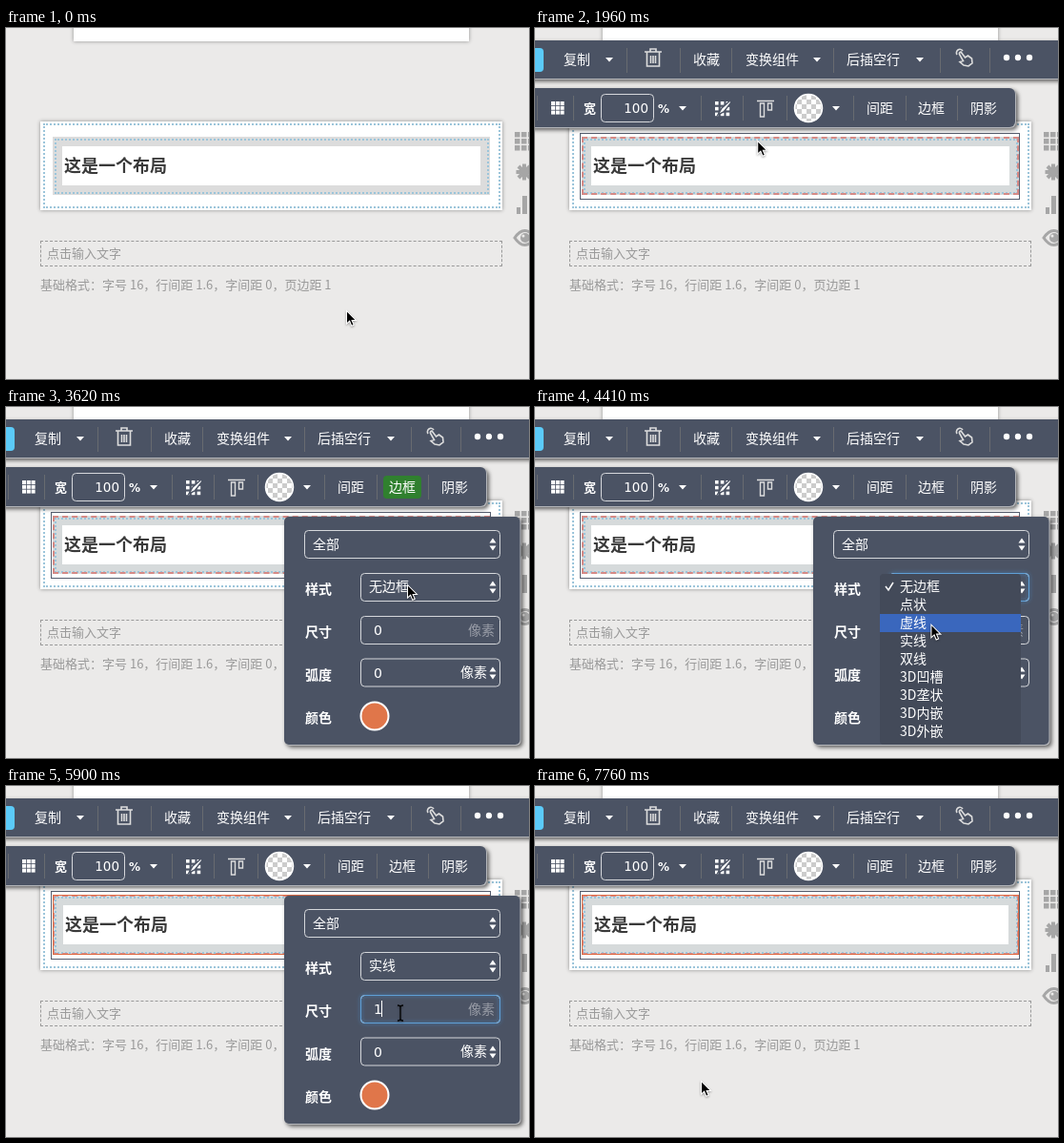
An HTML page that plays this animation: 549x368 px, repeating every 8 s.

```html
<!DOCTYPE html>
<html lang="zh">
<head>
<meta charset="utf-8">
<style>
html, body { margin: 0; width: 100%; height: 100%; overflow: hidden; background: #ebeae9; }
svg { display: block; font: 14px "Noto Sans CJK SC", "Noto Sans CJK", sans-serif; }
text { white-space: pre; }
.num { font-family: "DejaVu Sans", sans-serif; }
.bold { font-weight: 700; }
.hint { font-size: 13px; fill: #999; }
.bar { fill: #4b5364; filter: drop-shadow(1px 1px 0 #b4b6ba) drop-shadow(2px 2px 2px rgba(0,0,0,.6)); }
.field { fill: none; stroke: #d5d7db; }
.ring { fill: none; stroke: #5f9fd6; filter: drop-shadow(0 0 2px #4aa3f0); }
.box { position: absolute; box-sizing: border-box; }
.card { background: #fff; box-shadow: 0 0 4px rgba(0,0,0,.4); }
.dots { border: 2px dotted #9cc5da; }
.selected { border: 2px dashed #d68a86; }
.bordered { border: 1px solid #e06c45; }
.outlined { border: 1px solid #555d6e; }
.input { border: 1px dashed #999; }
.cursor { filter: drop-shadow(0 1px 1px rgba(0,0,0,.35)); }
</style>
</head>
<body>
<svg id="stage" width="549" height="368" viewBox="0 0 549 368"></svg>
<script>
const LOOP = 8000, STEP = 86;

const rect = (x1, y1, x2, y2, attrs = '') =>
  `<rect x="${x1}" y="${y1}" width="${x2 - x1}" height="${y2 - y1}" ${attrs}/>`;
const box = (x1, y1, x2, y2, cls, background = 'none') =>
  `<div class="box ${cls}" style="left:${x1}px;top:${y1}px;width:${x2 - x1}px;height:${y2 - y1}px;`
  + (background === 'none' ? '"></div>' : `background:${background}"></div>`);
const boxes = body => `<foreignObject width="549" height="368"><div style="position:relative">${body}</div></foreignObject>`;
const text = (x, y, s, attrs = '') => `<text x="${x}" y="${y}" ${attrs}>${s}</text>`;
const path = (d, attrs = '') => `<path d="${d}" ${attrs}/>`;
const circle = (x, y, r, attrs = '') => `<circle cx="${x}" cy="${y}" r="${r}" ${attrs}/>`;
const group = (id, body, attrs = '') => `<g id="${id}" ${attrs}>${body}</g>`;
const times = (n, f) => Array.from({ length: n }, (_, i) => f(i)).join('');
const grid = (x, y, size, pitch) => times(9, i => {
  const left = x + i % 3 * pitch, top = y + (i / 3 | 0) * pitch;
  return rect(left, top, left + size, top + size);
});
const dividers = (y, xs) =>
  path(xs.map(x => `M${x}.5 ${y}v26`).join(''), 'stroke="#686b70" fill="none"');
const carets = (y, xs) => path(xs.map(x => `M${x - 4} ${y - 2}h8l-4 4.5z`).join(''));
const spinner = y => path(`M507.5 ${y - 1.5}l3.5-5 3.5 5zM507.5 ${y + 1.5}l3.5 5 3.5-5z`);
const field = (y, x = 372.5, cls = 'field') =>
  rect(x, y, 518.5, y + 29, `rx="4" class="${cls}"`);

// The edited block; a 1px border makes it 2px taller.
function layout(selected, outlined, bordered) {
  const b = bordered ? 1 : 0, g = 2 * b;
  return boxes(
      box(36, 98, 521, 191 + g, 'card')
      + box(39, 100, 519, 189 + g, 'dots')
      + box(49, 114, 508, 175 + g, '', outlined ? '#d6dadb' : '#dcdcdc')
      + box(51, 116, 507, 174 + g, 'dots')
      + box(59 + b, 124 + b, 498 - b, 165 + b, '', '#fff')
      + (selected ? box(49, 114, 508, 175 + g, 'selected') : '')
      + (bordered ? box(49, 114, 508, 177, 'bordered') : '')
      + (outlined ? box(47, 110, 509, 180 + g, 'outlined') : '')
      + box(36, 223 + g, 521, 250 + g, 'input'))
    + text(61 + b, 151 + b, '这是一个布局', 'class="bold" font-size="18" fill="#3a3a3a"')
    + text(43, 241 + g, '点击输入文字', 'class="hint"')
    + text(36, 274 + g, '基础格式：字号 16，行间距 1.6，字间距 0，页边距 1', 'class="hint"');
}

const sideIcons = `<g fill="#a6a6a6" stroke="#a6a6a6" stroke-width="0">
  ${grid(534, 109, 5.5, 7)}
  ${times(4, i => path('M544 142.5v17', `stroke-width="4" transform="rotate(${i * 45} 544 151)"`))}
  ${rect(536, 188, 540, 195)}${rect(542, 176, 547, 195)}${rect(549, 182, 553, 195)}
  ${path('M534 220q10-15 22 0q-12 15-22 0z', 'fill="none" stroke-width="3"')}${circle(545, 220, 5)}
  ${circle(543, 218, 1.5, 'fill="#ebeae9"')}</g>`;

const toolbar = rect(-9, 13, 560, 53, 'class="bar"') + rect(-9, 63, 504, 104, 'rx="6" class="bar"')
  + rect(-9, 21, 9, 46, 'rx="4" fill="#5bcaf8"')
  + dividers(21, [96, 152, 206, 313, 425, 477]) + carets(33, [78, 296, 404])
  + text(30, 38, '复制') + text(166, 38, '收藏') + text(221, 38, '变换组件') + text(327, 38, '后插空行')
  + path('M115 25h18M121 25v-3h6v3M117.5 25v15h13v-15M121.5 29v8M124 29v8M126.5 29v8',
      'fill="none" stroke="#ddd" stroke-width="1.6"')
  + path('M443 28a3.5 3.5 0 1 1 6-4M447 25l4.500 6 3-2 4 3 .5 5-4 3-5-1-4-3.500 3.500-1-4-7q-.5-2 1.500-2.500z',
      'fill="none" stroke="#ddd" stroke-width="1.6"')
  + times(3, i => circle(495 + i * 12, 31, 3.2))
  + dividers(71, [2, 40, 174, 218, 264, 334, 389, 443]) + carets(84, [155, 316])
  + grid(17, 77, 4, 4.8) + text(51, 89, '宽', 'class="bold" font-size="13"')
  + rect(69.5, 69.5, 124.5, 98.5, 'rx="4" class="field"')
  + text(119, 89, '100', 'class="num" font-size="13.5" text-anchor="end"')
  + text(129, 89, '%', 'class="num bold" font-size="12"')
  + grid(189, 77, 3.6, 5.8) + path('M205 76l-9 8-4 7 6-3 8-10z', 'stroke="#4b5364" stroke-width="1.5"')
  + path('M233 76.5h18M236.5 79v14h4v-14zM244.5 79v7h4v-7z', 'fill="none" stroke="#ddd" stroke-width="1.4"')
  + circle(287, 84, 14.5, 'fill="url(#checker)" stroke="#fff" stroke-width="1.5"')
  + text(348, 89, '间距') + group('pressed', rect(396, 72, 436, 96, 'rx="4" fill="#30802f"'))
  + text(402, 89, '边框') + text(457, 89, '阴影');

const panel = rect(292, 115, 539.5, 354, 'rx="5" class="bar"')
  + field(129.5, 313.5) + text(322, 149, '全部') + spinner(144)
  + ['样式', '尺寸', '弧度', '颜色'].map((s, i) => text(314, 196 + 45 * i, s, 'class="bold"')).join('')
  + times(3, i => field(174.5 + 45 * i - (i > 1 ? .5 : 0)))
  + text(381, 193, '', 'id="style"') + spinner(189)
  + text(386, 239, '', 'id="size" class="num"') + text(485, 239, '像素', 'fill="#989ca6"')
  + text(386, 284, '0', 'class="num"') + text(477, 283, '像素') + spinner(279)
  + circle(387, 324, 14.5, 'fill="#e0764a" stroke="#fff" stroke-width="2"')
  + group('styleRing', field(174.5, 372.5, 'ring')) + group('sizeRing', field(219.5, 372.5, 'ring'))
  + group('caret', rect(394, 225, 395, 242));

const styles = ['无边框', '点状', '虚线', '实线', '双线', '3D凹槽', '3D垄状', '3D内嵌', '3D外嵌'];
const menu = rect(362, 175, 510, 354, 'rx="4" fill="#434a59"')
  + rect(362, 179, 510, 198, 'id="choice" fill="#3a67bd"')
  + path('M368 188l3 4 5-8', 'fill="none" stroke="#fff" stroke-width="1.5"')
  + styles.map((s, i) => text(383, 193 + 19 * i, s)).join('');

const pointers = group('arrow', path('M0 0V15.5L3.6 12.2 6 18 8.800 16.800 6.400 11.300H11.300Z',
    'stroke="#fff" stroke-width="1.2" transform="translate(.5 .5) scale(.88)"'))
  + group('hand', path('M-1.5 4V-3.5a1.6 1.6 0 0 1 3.2 0V0q2.8-.8 2.9 1q2.5-.6 2.6 1q2.2-.4 2.2 1.5V6q0 2-1.5 4v2H-2v-2L-5.8 4.5q.6-2.6 3-.5z',
    'fill="#fff" stroke="#000"'))
  + group('beam', path('M-3-8q3 0 3 2q0-2 3-2M0-6V6M-3 8q3 0 3-2q0 2 3 2', 'fill="none" stroke="#000" stroke-width="1.3"'));

const stage = document.getElementById('stage');
stage.innerHTML = `<defs><pattern id="checker" width="10" height="10" patternUnits="userSpaceOnUse">
  <path fill="#fff" d="M0 0h10v10H0z"/><path fill="#ccc" d="M0 0h5v5H0zM5 5h5v5H5z"/></pattern></defs>`
  + rect(0, 0, 549, 368, 'fill="#ebeae9"') + boxes(box(71, -9, 486, 14, 'card'))
  + sideIcons + group('layout', '') + group('toolbar', toolbar, 'fill="#fff"')
  + group('panel', panel, 'fill="#fff"') + group('menu', menu, 'fill="#fff"')
  + group('cursor', pointers, 'class="cursor"');

const $ = id => document.getElementById(id);
const show = (id, visible) => $(id).setAttribute('display', visible ? 'inline' : 'none');
const within = (t, from, to) => t >= from && t < to;

// Start time, number of steps, destination
const moves = [
  [260, 7, 225, 120], [970, 1, 225, 119], [1960, 8, 415, 93],
  [3100, 7, 421, 186], [4060, 7, 414, 238], [6350, 3, 174, 309],
];

function cursorAt(t) {
  let x = 357, y = 296;
  for (const [start, steps, toX, toY] of moves) {
    if (t < start) break;
    const p = Math.min(1, (Math.floor((t - start + 4) / STEP) + 1) / steps);
    const e = p * p * (3 - 2 * p);
    x += (toX - x) * e;
    y += (toY - y) * e;
  }
  return [x, y];
}

function menuOpacity(t) {
  if (!within(t, 3790, 5270)) return 0;
  const step = Math.floor((t - 4750 + 4) / STEP);
  return step < 2 ? 1 : .6 * .45 ** (step - 2);
}

let layoutKey;
function render(t) {
  const selected = t >= 1420, outlined = t >= 1510, bordered = t >= 5900;
  const key = [selected, outlined, bordered].join();
  if (key !== layoutKey) {
    $('layout').innerHTML = layout(selected, outlined, bordered);
    layoutKey = key;
  }
  show('toolbar', outlined);
  show('pressed', within(t, 2830, 3710));

  show('panel', within(t, 2830, 7760));
  $('panel').setAttribute('opacity', t < 7670 ? 1 : .5);
  $('style').textContent = t < 5270 ? '无边框' : '实线';
  $('size').textContent = bordered ? '1' : '0';
  show('styleRing', within(t, 3710, 5450));
  show('sizeRing', t >= 5540);
  show('caret', within(t, 5900, 6435) || within(t, 6880, 7410));

  const [x, y] = cursorAt(t);
  $('menu').setAttribute('opacity', menuOpacity(t));
  $('choice').setAttribute('y', 179 + 19 * Math.max(0, Math.floor((y - 179) / 19)));
  show('choice', !within(t, 4750, 4830));

  const beam = within(t, 5450, 6350), hand = y < (t < 1420 ? 176 : 106);
  $('cursor').setAttribute('transform', `translate(${x.toFixed(1)} ${y.toFixed(1)})`);
  show('beam', beam);
  show('hand', hand && !beam);
  show('arrow', !hand && !beam);
}

function tick() {
  render(performance.now() % LOOP);
  requestAnimationFrame(tick);
}
tick();
</script>
</body>
</html>
```
